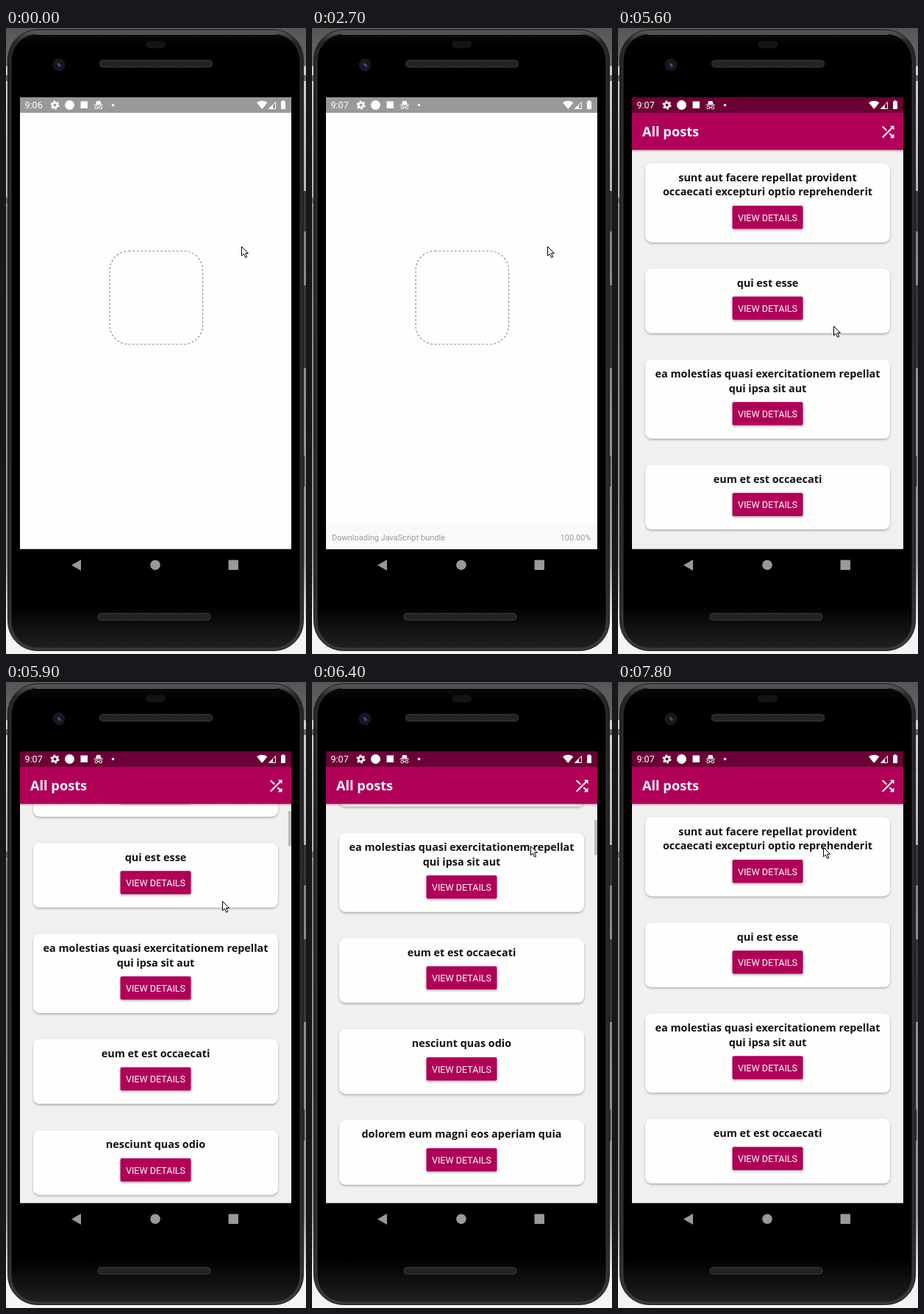
Write an HTML page that moves like this. It is 408 by 849 pixels and loops after 8 s.

```html
<!DOCTYPE html>
<html lang="en">
<head>
<meta charset="utf-8">
<title>Posts app</title>
<style>
  html, body { margin: 0; width: 100%; height: 100%; overflow: hidden; background: #fff; }
  svg { display: block; width: 100vw; height: 100vh; }
  .ui { font-family: Roboto, sans-serif; }
  .bold { font-family: "Open Sans", sans-serif; font-weight: 700; }
</style>
</head>
<body>
<svg viewBox="0 0 408 849" xmlns="http://www.w3.org/2000/svg">
  <defs>
    <linearGradient id="desk" x2="0" y2="1">
      <stop offset="0" stop-color="#555"/>
      <stop offset=".06" stop-color="#6a6a6a"/>
      <stop offset=".062" stop-color="#d0d0d0"/>
      <stop offset=".27" stop-color="#b4b4b4"/>
      <stop offset=".29" stop-color="#858585"/>
      <stop offset=".85" stop-color="#999"/>
      <stop offset=".96" stop-color="#f4f4f4"/>
    </linearGradient>
    <linearGradient id="metal" x2="0" y2="1">
      <stop offset="0" stop-color="#5c5c5c"/>
      <stop offset=".02" stop-color="#262626"/>
      <stop offset=".9" stop-color="#2c2c2c"/>
      <stop offset="1" stop-color="#3a3a3a"/>
    </linearGradient>
    <linearGradient id="glass" x2="0" y2="1">
      <stop offset="0" stop-color="#0a0a0a"/>
      <stop offset=".02" stop-color="#000"/>
      <stop offset=".93" stop-color="#000"/>
      <stop offset="1" stop-color="#202020"/>
    </linearGradient>
    <linearGradient id="drop" x2="0" y2="1">
      <stop offset="0" stop-opacity=".2"/>
      <stop offset="1" stop-opacity="0"/>
    </linearGradient>
    <pattern id="mesh" width="3" height="3" patternUnits="userSpaceOnUse">
      <path d="M0 3L3 0" stroke="#383536" stroke-width=".8"/>
    </pattern>
    <filter id="soft" x="-10%" y="-20%" width="120%" height="150%">
      <feDropShadow dx="0" dy="1.6" stdDeviation="1.7" flood-opacity=".3"/>
    </filter>
    <clipPath id="view"><rect x="19" y="165.5" width="369" height="541"/></clipPath>
  </defs>

  <!-- phone body -->
  <rect width="408" height="849" fill="url(#desk)"/>
  <path d="M0 68H8M400 68H408M0 234H6" stroke="#666" stroke-width="8"/>
  <path d="M0 118H8M0 157H8M400 118H408M400 157H408" stroke="#aaa"/>
  <path d="M406 221V276M406 349V461" stroke="#383838" stroke-width="4"/>
  <path d="M405 580V622" stroke="#444" stroke-width="3"/>
  <rect x="2.500" y="2.500" width="402" height="842" rx="40" fill="url(#metal)" stroke="#1a1a1a"/>
  <rect x="7" y="8" width="393" height="833" rx="36" fill="url(#glass)" stroke="#3c3c3c" stroke-width=".8"/>
  <path d="M40 8.500H368" stroke="#707070"/>
  <rect x="190" y="17.500" width="27" height="10" rx="5" fill="#171315"/>
  <g id="speakers"></g>
  <circle cx="72" cy="50" r="8.500" fill="#18181c"/>
  <circle cx="72" cy="50" r="5" fill="#14182c"/>
  <circle cx="73" cy="51" r="1.800" fill="#3c4f88"/>
  <circle cx="71.500" cy="49" r=".9" fill="#8d97b4"/>
  <g fill="#999">
    <path d="M89 728.500L102 721V736Z"/>
    <circle cx="203" cy="728.300" r="6.800"/>
    <rect x="302.500" y="721.500" width="13.500" height="13.500" rx="1"/>
  </g>

  <!-- screen -->
  <rect id="page" x="19" y="94" width="369" height="612.700" fill="#fefefd"/>
  <g id="splash">
    <rect x="141" y="302.500" width="126.500" height="126.500" rx="26" fill="none" stroke="#8c8c8c" stroke-width="1.200" stroke-dasharray="2.700 2.700"/>
    <g id="bar" class="ui" font-size="11" fill="#9b9b9b">
      <rect x="19" y="674" width="369" height="32.700" fill="#f9f9f9"/>
      <text id="task" x="27" y="695"></text>
      <text id="pct" x="379.500" y="695" text-anchor="end"></text>
    </g>
  </g>
  <g id="app">
    <g clip-path="url(#view)">
      <g id="list"></g>
      <rect id="thumb" x="384" width="4" fill="#bababa"/>
      <rect x="19" y="165" width="369" height="4" fill="url(#drop)"/>
    </g>
    <rect x="19" y="94" width="369" height="71.500" fill="#b00058"/>
    <text class="bold" x="33" y="147" font-size="18.200" fill="#fff">All posts</text>
    <path transform="translate(354.900 128.600) scale(1.03)" fill="#fff" d="M10.6 9.200L5.400 4 4 5.400l5.200 5.200zM14.500 4l2 2L4 18.600 5.400 20 18 7.500l2 2V4zM14.800 13.400l-1.400 1.400 3.100 3.100-2 2.100H20v-5.500l-2 2z"/>
  </g>

  <!-- status bar -->
  <rect x="19" y="94" width="369" height="21" fill="#000" fill-opacity=".4"/>
  <text id="clock" class="ui" x="25.500" y="109" font-size="12.570" fill="#fff"></text>
  <g fill="none" stroke="#fff">
    <circle cx="66.500" cy="104.500" r="3.300" stroke-width="2.600"/>
    <circle cx="66.500" cy="104.500" r="5.200" stroke-width="1.800" stroke-dasharray="2.700 2.745"/>
    <circle cx="122.800" cy="108" r="1.900"/>
    <circle cx="128.800" cy="108" r="1.900"/>
    <path d="M124.700 107.500H127M119.500 104.300H132"/>
    <path d="M357.500 109.500L366.500 100.500V109.500Z"/>
  </g>
  <g fill="#fff">
    <circle cx="86.500" cy="104.500" r="6.500"/>
    <rect x="101.500" y="99.500" width="9.500" height="9.500"/>
    <path d="M121.800 103.500L123.300 99H128.300L129.800 103.500Z"/>
    <circle cx="145.500" cy="104.500" r="1.700"/>
    <path d="M348.200 110L341 101.200Q348.200 96.500 355.400 101.200Z"/>
    <path d="M357 110L363 104V110Z"/>
    <path d="M374 99.500H375.700V98.300H378.300V99.500H380V110H374Z"/>
  </g>

  <path id="mouse" d="M.5 .5V13L3.400 10.300L5.600 15.400L7.700 14.500L5.500 9.500H9.400Z" fill="#fff" stroke="#000"/>
</svg>
<script>
const LOOP = 8000, TOP = 165.5, VIEW = 541, MID = 203.5;
const $ = id => document.getElementById(id);

function add(parent, tag, attrs, text) {
  const el = document.createElementNS("http://www.w3.org/2000/svg", tag);
  for (const k in attrs) el.setAttribute(k, attrs[k]);
  if (text) el.textContent = text;
  parent.appendChild(el);
  return el;
}

for (const [x, y] of [[127.5, 44], [125, 794]])
  for (const fill of ["#1e1b1c", "url(#mesh)"])
    add($("speakers"), "rect", { x, y, width: 153, height: 9, rx: 4, fill, stroke: "#353233" });

const posts = [
  ["sunt aut facere repellat provident", "occaecati excepturi optio reprehenderit"],
  ["qui est esse"],
  ["ea molestias quasi exercitationem repellat", "qui ipsa sit aut"],
  ["eum et est occaecati"],
  ["nesciunt quas odio"],
  ["dolorem eum magni eos aperiam quia"]
];

let cardY = 183.3;
for (const lines of posts) {
  const extra = (lines.length - 1) * 19.7, height = 87.5 + extra;
  const card = add($("list"), "g", { transform: `translate(0 ${cardY})`, "text-anchor": "middle" });
  add(card, "rect", { x: 37, width: 333, height, rx: 9, fill: "#fefefd", filter: "url(#soft)" });
  lines.forEach((line, i) =>
    add(card, "text", { class: "bold", x: MID, y: 24.3 + i * 19.7, "font-size": 14.4, fill: "#111" }, line));
  add(card, "rect", { x: 155.5, y: 38 + extra, width: 96, height: 31.5, rx: 2, fill: "#b00058", filter: "url(#soft)" });
  add(card, "text", { class: "ui", x: MID, y: 58.8 + extra, "font-size": 12.57, fill: "#fff" }, "VIEW DETAILS");
  cardY += height + 35.8;
}

// rows of [time, value, ...]
const mousePath = [
  [4000, 320, 296], [4300, 301, 205], [4500, 262, 128], [4700, 236, 190], [4900, 260, 344],
  [5200, 293, 404], [5600, 293, 404], [6100, 295, 225], [6200, 296, 222], [6500, 298, 222],
  [6800, 312, 357], [7000, 315, 450], [7200, 290, 400], [7400, 255, 284], [7500, 249, 262], [7800, 279, 224]
];
const scrollPath = [
  [5600, 0], [6100, 180], [6200, 207], [6300, 233], [6400, 245], [6500, 245], [6800, 110], [7000, 0]
];
const thumbFade = [[4900, 1], [5200, 0], [5600, 0], [5700, 1], [7400, 1], [7700, 0]];
const contentSteps = [[3700, 1290], [3900, 2735], [4200, 3900], [4500, 5000], [4800, 6150]];
const loadSteps = [
  [1400, "Building", 12.84], [1500, "Building", 38.27], [1600, "Building", 64.51], [1700, "Building", 92.36],
  [1900, "Downloading", 24.18], [2000, "Downloading", 76.42], [2200, "Downloading", 100]
];

function along(path, t) {
  const i = path.findIndex(p => p[0] > t);
  if (i === 0) return path[0].slice(1);
  if (i < 0) return path[path.length - 1].slice(1);
  const a = path[i - 1], b = path[i], k = (t - a[0]) / (b[0] - a[0]);
  return a.slice(1).map((v, n) => v + (b[n + 1] - v) * k);
}

const latest = (steps, t) => steps.filter(s => s[0] <= t).pop();
const show = (id, on) => $(id).setAttribute("visibility", on ? "inherit" : "hidden");

function draw(time) {
  const t = Math.floor(time % LOOP / 100) * 100;
  const started = t >= 3300, listed = t >= 3700;

  $("clock").textContent = t < 2700 ? "9:06" : "9:07";
  $("page").setAttribute("fill", started ? "#f0f0ef" : "#fefefd");
  show("splash", !started);
  show("app", started);
  show("list", listed);
  show("thumb", listed);

  const load = latest(loadSteps, t);
  show("bar", load);
  if (load) {
    $("task").textContent = load[1] + " JavaScript bundle";
    $("pct").textContent = load[2].toFixed(2) + "%";
  }

  const [scroll] = along(scrollPath, t);
  $("list").setAttribute("transform", `translate(0 ${-scroll})`);
  if (listed) {
    const ratio = VIEW / latest(contentSteps, t)[1];
    $("thumb").setAttribute("y", TOP + scroll * ratio);
    $("thumb").setAttribute("height", VIEW * ratio);
    $("thumb").setAttribute("opacity", along(thumbFade, t)[0]);
  }

  const [x, y] = along(mousePath, t).map(Math.round);
  $("mouse").setAttribute("transform", `translate(${x} ${y})`);
}

const start = performance.now();
function tick() {
  draw(performance.now() - start);
  requestAnimationFrame(tick);
}
tick();
</script>
</body>
</html>
```
